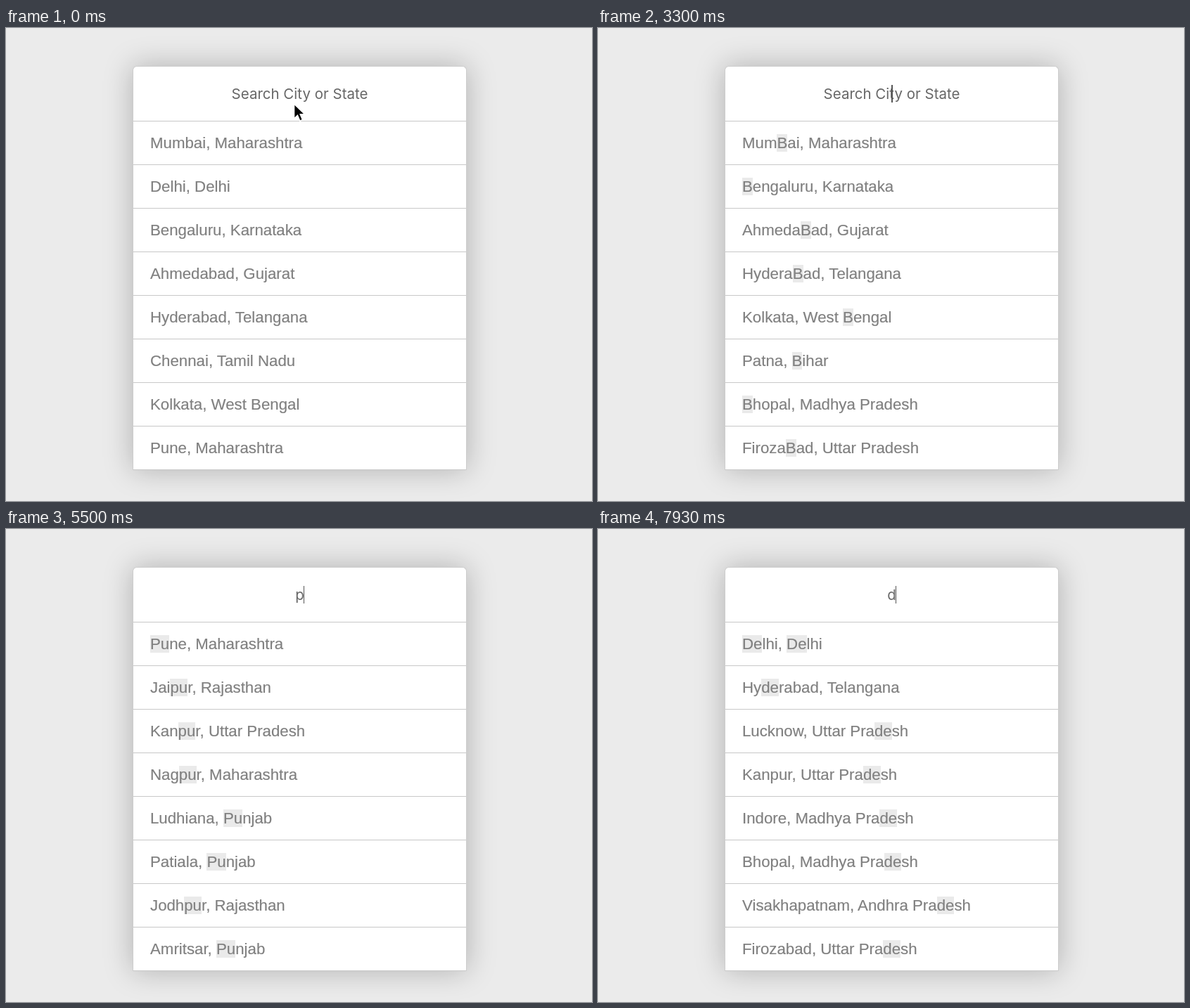
An HTML page for the animation above (8 s loop, 833x673 px).

```html
<!DOCTYPE html>
<html lang="en">
<head>
<meta charset="utf-8">
<title>City search</title>
<style>
  html, body { margin: 0; width: 100%; height: 100%; overflow: hidden; background: #ebebeb; }
  #card {
    position: absolute; left: 180px; top: 54px; width: 473px;
    border: 1px solid #cdcdcd; border-bottom: 0; border-radius: 6px 6px 0 0;
    background: #fff; box-shadow: 0 0 40px rgba(0, 0, 0, .25);
  }
  #field {
    height: 77px; line-height: 78px; border-bottom: 1px solid #c8c8c8; text-align: center;
    font-family: Inter, sans-serif; font-size: 20.5px; color: #676767; white-space: nowrap;
  }
  #caret { position: absolute; top: 26px; width: 1.5px; height: 25px; background: #555; }
  #list { margin: 0; padding: 0; list-style: none; }
  li {
    height: 61px; line-height: 61px; padding-left: 24px; border-bottom: 1px solid #c8c8c8;
    font-family: "Liberation Sans", Arial, sans-serif; font-size: 22.25px; color: #808080;
    -webkit-text-stroke: .2px #808080; text-transform: capitalize; white-space: nowrap;
  }
  mark { color: inherit; background: #eaeaea; }
  #pointer { position: absolute; left: 407px; top: 105px; }
</style>
</head>
<body>
<div id="card">
  <div id="field"><span id="text"></span><i id="caret"></i></div>
  <ul id="list"></ul>
</div>
<svg id="pointer" width="22" height="32">
  <path d="M2.5 3v21l4.9-4.6 3.4 7.8 3.8-1.6-3.3-7.7h6.7z" stroke="#fff" stroke-width="1.6"/>
</svg>
<script>
const regions = {
  MH: 'Maharashtra', UP: 'Uttar Pradesh', MP: 'Madhya Pradesh', WB: 'West Bengal',
  KA: 'Karnataka', RJ: 'Rajasthan', PB: 'Punjab', DL: 'Delhi', GJ: 'Gujarat',
  TG: 'Telangana', TN: 'Tamil Nadu', BR: 'Bihar', AP: 'Andhra Pradesh'
};
const cities = `Mumbai MH|Delhi DL|Bengaluru KA|Ahmedabad GJ|Hyderabad TG|Chennai TN|Kolkata WB|Pune MH
|Jaipur RJ|Lucknow UP|Kanpur UP|Nagpur MH|Patna BR|Indore MP|Bhopal MP|Visakhapatnam AP|Firozabad UP
|Ludhiana PB|Siliguri WB|Patiala PB|Jodhpur RJ|Amritsar PB|Jalandhar PB|Asansol WB|Belagavi KA
|Raghunathganj WB|Kharagpur WB|Bathinda PB|Begusarai BR|New Delhi DL|Naihati WB|English Bazar WB
|Pathankot PB|Abohar PB`.split('|').map(c => c.trim().replace(/ (..)$/, (_, r) => ', ' + regions[r]));

// [time in ms, value]: the field follows each key press, the list each key release
const typed = [
  [500, ''], [1170, 'B'], [1530, 'Be'], [1730, 'Ben'], [2000, 'Beng'], [2070, 'Benga'],
  [2700, 'Beng'], [2840, 'Ben'], [2980, 'Be'], [3130, 'B'], [3300, ''],
  [3730, 'p'], [4000, 'pu'], [4230, 'pun'], [4370, 'pune'],
  [5270, 'pun'], [5400, 'pu'], [5500, 'p'], [5700, ''],
  [6000, 'd'], [6130, 'de'], [6230, 'del'], [6500, 'delh'], [6900, 'delhi'],
  [7370, 'delh'], [7530, 'del'], [7700, 'de'], [7930, 'd']
];
const searched = [
  [0, ''], [1370, 'B'], [1630, 'Be'], [1830, 'Ben'], [2170, 'Benga'],
  [2770, 'Beng'], [2910, 'Ben'], [3060, 'Be'], [3230, 'B'],
  [3830, 'p'], [4100, 'pu'], [4470, 'pune'], [5330, 'pun'], [5470, 'pu'], [5630, 'p'],
  [6070, 'd'], [6200, 'de'], [6400, 'del'], [6600, 'delh'], [7000, 'delhi'],
  [7470, 'delh'], [7600, 'del'], [7800, 'de']
];

const el = id => document.getElementById(id);
const latest = (steps, t) => steps.findLast(step => step[0] <= t);
let shownQuery = null;

function showList(query) {
  if (query === shownQuery) return;
  shownQuery = query;
  const pattern = new RegExp(query, 'gi');
  el('list').innerHTML = cities
    .filter(city => city.search(pattern) >= 0)
    .slice(0, 8)
    .map(city => `<li>${query ? city.replace(pattern, `<mark>${query}</mark>`) : city}</li>`)
    .join('');
}

function draw() {
  const t = performance.now() % 8000;
  const [since, value] = latest(typed, t) || [Infinity, ''];
  const text = el('text'), caret = el('caret');
  text.textContent = value || 'Search City or State';
  caret.style.left = 236 + (value ? text.offsetWidth / 2 - 1 : 0) + 'px';
  caret.hidden = t < since || (t - since) % 1000 >= 500;
  caret.style.display = caret.hidden ? 'none' : 'block';
  el('pointer').style.display = t < 1170 ? 'block' : 'none';
  showList(latest(searched, t)[1]);
  requestAnimationFrame(draw);
}
draw();
</script>
</body>
</html>
```
